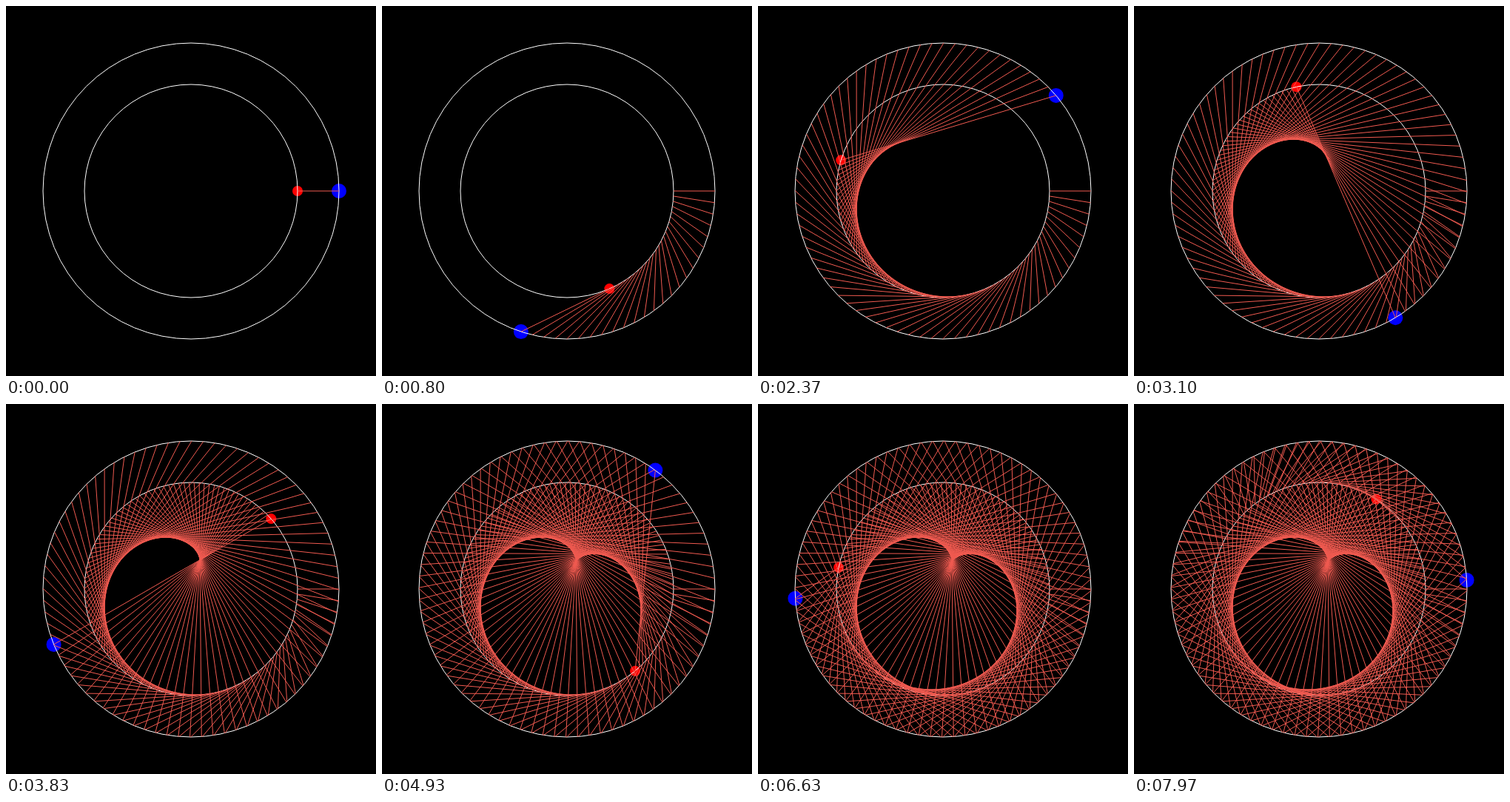
An HTML page for the animation above (8 s loop, 500 by 500 pixels).

```html
<!DOCTYPE html>
<html lang="en">
<head>
<meta charset="utf-8">
<title>Orbit trails</title>
<style>
  html, body { margin: 0; width: 100%; height: 100%; overflow: hidden; background: #000; }
  svg { display: block; width: 100%; height: 100%; }
  .ring { fill: none; stroke: #fff; stroke-width: 1; }
  .trail { stroke: #f05a50; stroke-width: 1; }
</style>
</head>
<body>
<svg id="stage" viewBox="0 0 500 500"></svg>
<script>
const LOOP = 8000, FPS = 30, STEPS = LOOP * FPS / 1000;
const CENTER = 250, CYCLE = 1039;
const outer = { r: 200, turns: 13, size: 10, color: '#00f' };
const inner = { r: 144, turns: 8, size: 7, color: '#f00' };
const stage = document.getElementById('stage');

function add(tag, attrs) {
  const el = document.createElementNS('http://www.w3.org/2000/svg', tag);
  for (const key in attrs) el.setAttribute(key, attrs[key]);
  return stage.appendChild(el);
}

function place(orbit, step) {
  const a = 2 * Math.PI * orbit.turns * step / CYCLE;
  return [CENTER + orbit.r * Math.cos(a), CENTER + orbit.r * Math.sin(a)];
}

const orbits = [outer, inner];
for (const o of orbits) o.dot = add('circle', { r: o.size, fill: o.color });
for (const o of orbits) add('circle', { class: 'ring', cx: CENTER, cy: CENTER, r: o.r });

const trails = Array.from({ length: STEPS }, (_, i) => {
  const [x1, y1] = place(inner, i);
  const [x2, y2] = place(outer, i);
  return add('line', { class: 'trail', x1, y1, x2, y2 });
});

let shown = -1;

function draw(ms) {
  // Steps change on a 10 ms clock
  const tick = Math.floor((ms % LOOP) / 10) * 10 + 5;
  const step = Math.min(STEPS - 1, Math.floor(tick * FPS / 1000));
  if (step === shown) return;
  shown = step;
  for (const o of orbits) {
    const [x, y] = place(o, step);
    o.dot.setAttribute('cx', x);
    o.dot.setAttribute('cy', y);
  }
  trails.forEach((line, i) => line.setAttribute('visibility', i <= step ? 'visible' : 'hidden'));
}

const start = performance.now();
function loop() {
  draw(performance.now() - start);
  requestAnimationFrame(loop);
}
loop();
</script>
</body>
</html>
```
